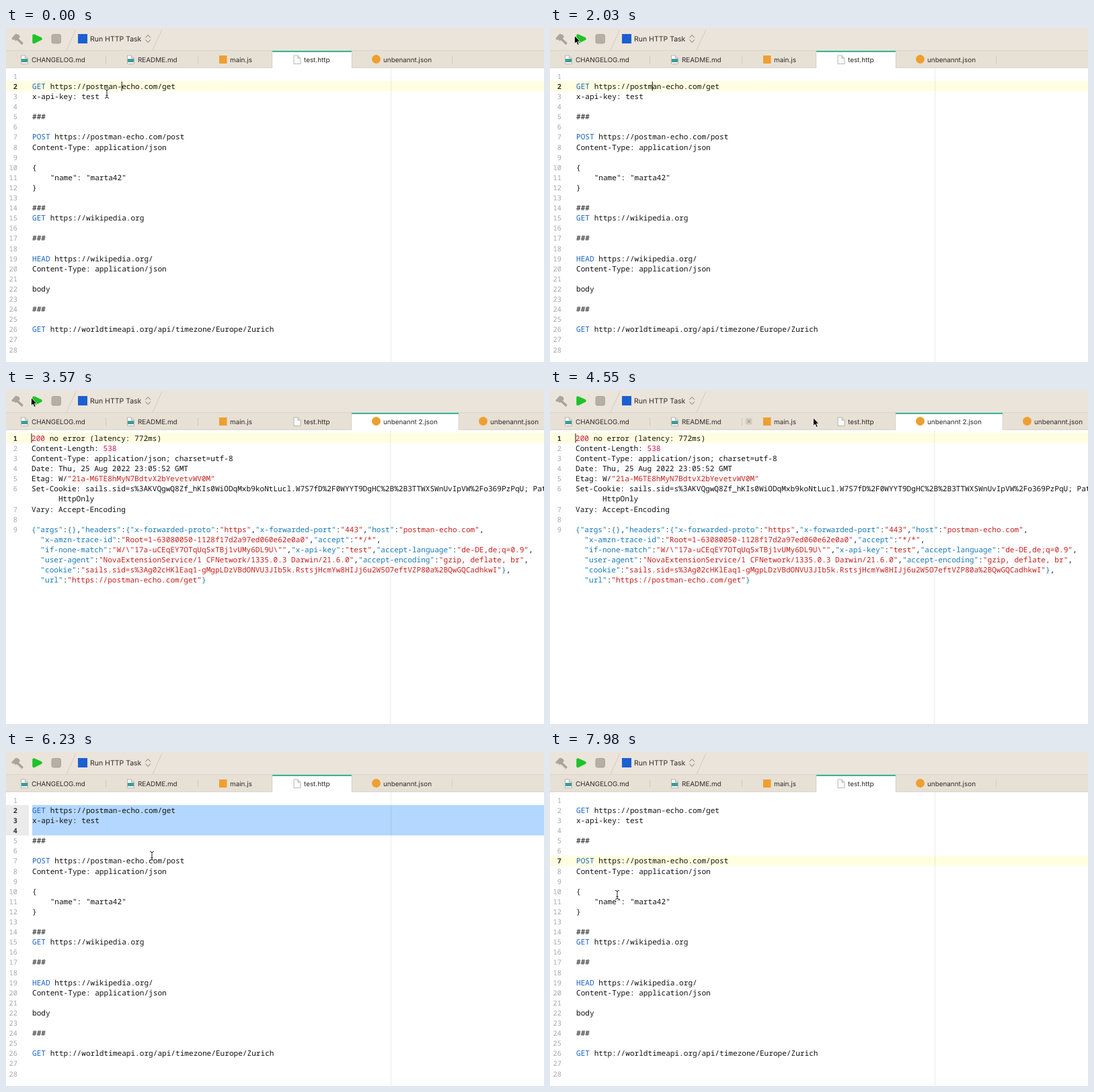
Recreate the animation shown at these times as an HTML page. Size 800x498 px, loop 8000 ms.

```html
<!DOCTYPE html>
<html lang="en">
<head>
<meta charset="utf-8">
<title>HTTP task in a code editor</title>
<style>
  html, body { margin: 0; width: 100%; height: 100%; overflow: hidden; background: #fff; }
  svg { display: block; width: 100vw; height: 100vh; }
  text { white-space: pre; text-rendering: geometricPrecision; }
  .ui { font: 9.9px Inter, sans-serif; fill: #2c2a27; }
  .task { font-size: 10.5px; }
  .code { font: 11.1px "Noto Sans Mono", monospace; fill: #111; }
  .num { font-size: 10.4px; fill: #a6a6a6; text-anchor: end; }
  .num.on { fill: #333; font-weight: 600; }
  .verb { fill: #1a62c0; }
  .key { fill: #1878b8; }
  .str { fill: #c4201c; }
  .value { fill: #d0104c; }
  .row { fill: #fffee0; }
  .caret { fill: #222; }

  /* One loop is 8 s, so 1% is 80 ms. */
  .cut { animation: 8s step-end infinite; }
  .file { animation-name: file; }
  .response { animation-name: response; }
  .line2 { animation-name: line2; }
  .block { animation-name: block; }
  .line7 { animation-name: line7; }
  .caretA { animation-name: caretA; }
  .caretB { animation-name: caretB; }
  .caretC { animation-name: caretC; }
  .caretD { animation-name: caretD; }
  .hover { animation-name: hover; }
  .arrow { animation-name: arrow; }
  .ibeam { animation-name: ibeam; }
  .mouse { animation: mouse 8s ease-in-out infinite; }

  @keyframes file { 0%, 65% { opacity: 1 } 42.875% { opacity: 0 } 100% { opacity: 1 } }
  @keyframes response { 0%, 65%, 100% { opacity: 0 } 42.875% { opacity: 1 } }
  @keyframes line2 { 0% { opacity: 1 } 34.125%, 100% { opacity: 0 } }
  @keyframes block { 0%, 91.875%, 100% { opacity: 0 } 34.125% { opacity: 1 } }
  @keyframes line7 { 0% { opacity: 0 } 91.875%, 100% { opacity: 1 } }
  @keyframes caretA { 0% { opacity: 1 } 6.25%, 100% { opacity: 0 } }
  @keyframes caretB { 0%, 18.5%, 31%, 100% { opacity: 0 } 12.25%, 24.75% { opacity: 1 } }
  @keyframes caretC { 0%, 49.125%, 61.625%, 100% { opacity: 0 } 42.875%, 55.375% { opacity: 1 } }
  @keyframes caretD { 0%, 98.125%, 100% { opacity: 0 } 91.875% { opacity: 1 } }
  @keyframes hover { 0%, 57.75%, 100% { opacity: 0 } 55.9% { opacity: 1 } }
  @keyframes arrow { 0%, 70.5%, 100% { opacity: 0 } 17.5% { opacity: 1 } }
  @keyframes ibeam { 0%, 70.5%, 100% { opacity: 1 } 17.5% { opacity: 0 } }
  @keyframes mouse {
    0%, 1.75% { transform: translate(150px, 98px) }
    7%, 14% { transform: translate(150px, 83.5px) }
    22.5%, 28% { transform: translate(36px, 11px) }
    33%, 53.4% { transform: translate(37px, 11px) }
    56.875% { transform: translate(391px, 41px) }
    61.5%, 67.5% { transform: translate(523px, 46px) }
    76%, 84% { transform: translate(217px, 155px) }
    90%, 92.5% { transform: translate(217px, 162px) }
    98.5%, 100% { transform: translate(100px, 213px) }
  }
</style>
</head>
<body>
<svg viewBox="0 0 800 498" preserveAspectRatio="none">
  <defs>
    <g id="page">
      <path d="M.5 .5h6l4 4v8.500h-10z" fill="#fafafa" stroke="#aaa69f" stroke-width=".8"/>
      <path d="M6.500 .5v4h4" fill="#ddd" stroke="#aaa69f" stroke-width=".8"/>
    </g>
    <g id="markdown">
      <use href="#page"/>
      <rect x="1" y="5.500" width="9" height="5" fill="#3a9c9c"/>
    </g>
    <circle id="json" r="6.500" fill="#eda02f"/>
    <path id="divider" d="M0 41v12" stroke="#d0c9bd"/>
    <path id="beam" d="M-3-6.500q3 0 3 2q0-2 3-2M0-4.500V4.500M-3 6.500q3 0 3-2q0 2 3 2M-1.500 2.500h3"/>
  </defs>

  <rect width="800" height="498" fill="#fff"/>
  <g id="file-view" class="cut file"></g>
  <g id="response-view" class="cut response"></g>

  <rect width="800" height="34" fill="#eae4db"/>
  <rect y="34" width="800" height="25.500" fill="#e7e0d5"/>
  <path d="M0 33.700h800M0 59.200h800" stroke="#d4ccc0" stroke-width=".8"/>
  <path d="M90 33L104 2M218 33L232 2" stroke="#d3ccc1"/>

  <g fill="#aaa59d" stroke="#96918a" stroke-width=".6">
    <path d="M8.500 15.500l6-6.500 4.500 1.500 1.500 3-6 5.500-2.500-2.500-1.500 1z"/>
    <path d="M16 17.500l2-2 7.500 7-2 2.300z"/>
  </g>
  <path d="M41.500 11.500L51.500 16 41.500 21z" fill="#1fc328" stroke="#1fc328" stroke-width="4.500" stroke-linejoin="round"/>
  <rect x="68" y="9.500" width="13.500" height="13.500" rx="2.500" fill="#b5afa6" stroke="#a29c93" stroke-width=".8"/>
  <rect x="107" y="9" width="14" height="14" fill="#1c5fd0"/>
  <text class="ui task" x="125" y="20">Run HTTP Task</text>
  <path d="M207.500 14.500l3.700-4 3.700 4M207.500 17.500l3.700 4 3.700-4" fill="none" stroke="#77726b"/>

  <g class="ui">
    <use href="#divider" x="148.500"/>
    <use href="#divider" x="285.500"/>
    <use href="#markdown" x="22" y="40.500"/>
    <text x="38" y="50.500">CHANGELOG.md</text>
    <use href="#markdown" x="180" y="40.500"/>
    <text x="196" y="50.500">README.md</text>
    <rect x="317" y="41" width="11.500" height="12" fill="#ef9f2e"/>
    <text x="333" y="50.500">main.js</text>

    <g class="cut file">
      <rect x="396" y="34" width="118" height="26" fill="#fff"/>
      <rect x="396" y="34" width="118" height="2" fill="#34b795"/>
      <path d="M395.700 34v25.500M514.300 34v25.500" stroke="#d4ccc0" stroke-width=".8"/>
      <use href="#json" x="550.500" y="46.500"/>
      <text x="561" y="50.500">unbenannt.json</text>
      <use href="#divider" x="663.500"/>
    </g>
    <g class="cut response">
      <rect x="514" y="34" width="159" height="26" fill="#fff"/>
      <rect x="514" y="34" width="159" height="2" fill="#34b795"/>
      <path d="M513.700 34v25.500M673.300 34v25.500" stroke="#d4ccc0" stroke-width=".8"/>
      <use href="#json" x="550.500" y="46.500"/>
      <text x="561" y="50.500">unbenannt 2.json</text>
      <use href="#json" x="709.500" y="46.500"/>
      <text x="720" y="50.500">unbenannt.json</text>
      <g class="cut hover">
        <rect x="291" y="42" width="9.500" height="9.500" rx="1.500" fill="#d2cbc0"/>
        <path d="M293.700 44.700l4 4M297.700 44.700l-4 4" stroke="#857f77" stroke-width=".9"/>
      </g>
    </g>
    <use href="#page" x="427.500" y="40.500"/>
    <text x="443" y="50.500">test.http</text>
  </g>

  <g class="mouse">
    <g class="cut ibeam" fill="none">
      <use href="#beam" stroke="#fff" stroke-width="2.400" opacity=".8"/>
      <use href="#beam" stroke="#222"/>
    </g>
    <path class="cut arrow" d="M.5 .5V12.500l2.700-2.500 2 4.500 2-.9-2-4.400h3.600z" fill="#000" stroke="#fff" stroke-width=".8"/>
  </g>
</svg>

<script>
const CHAR = 6.66, LINE = 15.1, TOP = 64;

const requestLines = `
GET https://postman-echo.com/get
x-api-key: test

###

POST https://postman-echo.com/post
Content-Type: application/json

{
    "name": "marta42"
}

###
GET https://wikipedia.org

###

HEAD https://wikipedia.org/
Content-Type: application/json

body

###

GET http://worldtimeapi.org/api/timezone/Europe/Zurich

`.split('\n');

const responseLines = String.raw`200 no error (latency: 772ms)
Content-Length: 538
Content-Type: application/json; charset=utf-8
Date: Thu, 25 Aug 2022 23:05:52 GMT
Etag: W/"21a-M6TE8hMyN7BdtvX2bYevetvWV0M"
Set-Cookie: sails.sid=s%3AKVQgwQ8Zf_hKIs0WiODqMxb9koNtLucl.W7S7fD%2F0WYYT9DgHC%2B%2B3TTWXSWnUvIpVW%2Fo369PzPqU; Path=/;
      HttpOnly
Vary: Accept-Encoding

{"args":{},"headers":{"x-forwarded-proto":"https","x-forwarded-port":"443","host":"postman-echo.com",
  "x-amzn-trace-id":"Root=1-63080050-1128f17d2a97ed060e62e0a0","accept":"*/*",
  "if-none-match":"W/\"17a-uCEqEY7OTqUq5xTBj1vUMy6DL9U\"","x-api-key":"test","accept-language":"de-DE,de;q=0.9",
  "user-agent":"NovaExtensionService/1 CFNetwork/1335.0.3 Darwin/21.6.0","accept-encoding":"gzip, deflate, br",
  "cookie":"sails.sid=s%3Ag02cHKlEaq1-gMgpLDzVBdONVU3JIb5k.RstsjHcmYw8HIJj6u2W5O7eftVZP80a%2BQwGQCadhkwI"},
  "url":"https://postman-echo.com/get"}`.split('\n');

const rowTop = row => TOP + row * LINE;
const rect = (x, y, w, h, attrs) => `<rect x="${x}" y="${y}" width="${w}" height="${h}" ${attrs}/>`;
const text = (x, row, body, cls = '') => `<text class="code ${cls}" x="${x}" y="${rowTop(row) + 11.8}">${body}</text>`;
const lineNumber = (row, label, cls = '') => text(17, row, label, 'num ' + cls);
const span = (cls, body) => `<tspan class="${cls}">${body}</tspan>`;
const activeRow = row => rect(0, rowTop(row), 800, LINE, 'class="row"') + lineNumber(row, row + 1, 'on');
const caret = (name, x, row, column) =>
  rect(x + column * CHAR - 0.5, rowTop(row) + 0.8, 1.1, 13.8, `class="caret cut ${name}"`);
const guide = x => rect(x, 59, 1, 439, 'fill="#000" opacity=".08"');
const fill = (id, parts) => { document.getElementById(id).innerHTML = parts.flat().join(''); };

const paintRequest = line => line.replace(/^(GET|POST|HEAD)/, verb => span('verb', verb));

function paintResponse(line, row) {
  if (row < 2) return line.replace(/^200|538/, n => span('value', n));
  const isJson = row > 8;
  return line.replace(/("(?:\\.|[^"\\])*")(:?)|[{}]+/g, (token, quoted, colon) =>
    quoted ? span(colon ? 'key' : 'str', quoted) + colon : isJson ? span('key', token) : token);
}

const selectedRows = [1, 2, 3];
fill('file-view', [
  requestLines.map((_, row) => lineNumber(row, row + 1)),
  `<g class="cut line2">${activeRow(1)}</g>`,
  `<g class="cut line7">${activeRow(6)}</g>`,
  `<g class="cut block">
    ${rect(0, rowTop(1), 34, 3 * LINE, 'fill="#ebebeb"')}
    ${rect(39, rowTop(1), 761, 3 * LINE, 'fill="#b3d7ff"')}
    ${selectedRows.map(row => lineNumber(row, row + 1, 'on')).join('')}
  </g>`,
  guide(572),
  requestLines.map((line, row) => text(39, row, paintRequest(line))),
  caret('caretA', 39, 1, 20),
  caret('caretB', 39, 1, 17),
  caret('caretD', 39, 6, 27),
]);

const numberedRows = [0, 1, 2, 3, 4, 5, 7, 8, 9];
fill('response-view', [
  numberedRows.map((row, i) => lineNumber(row, i + 1)),
  activeRow(0),
  guide(571),
  responseLines.map((line, row) => text(38, row, paintResponse(line, row))),
  caret('caretC', 38, 0, 0),
]);
</script>
</body>
</html>
```
